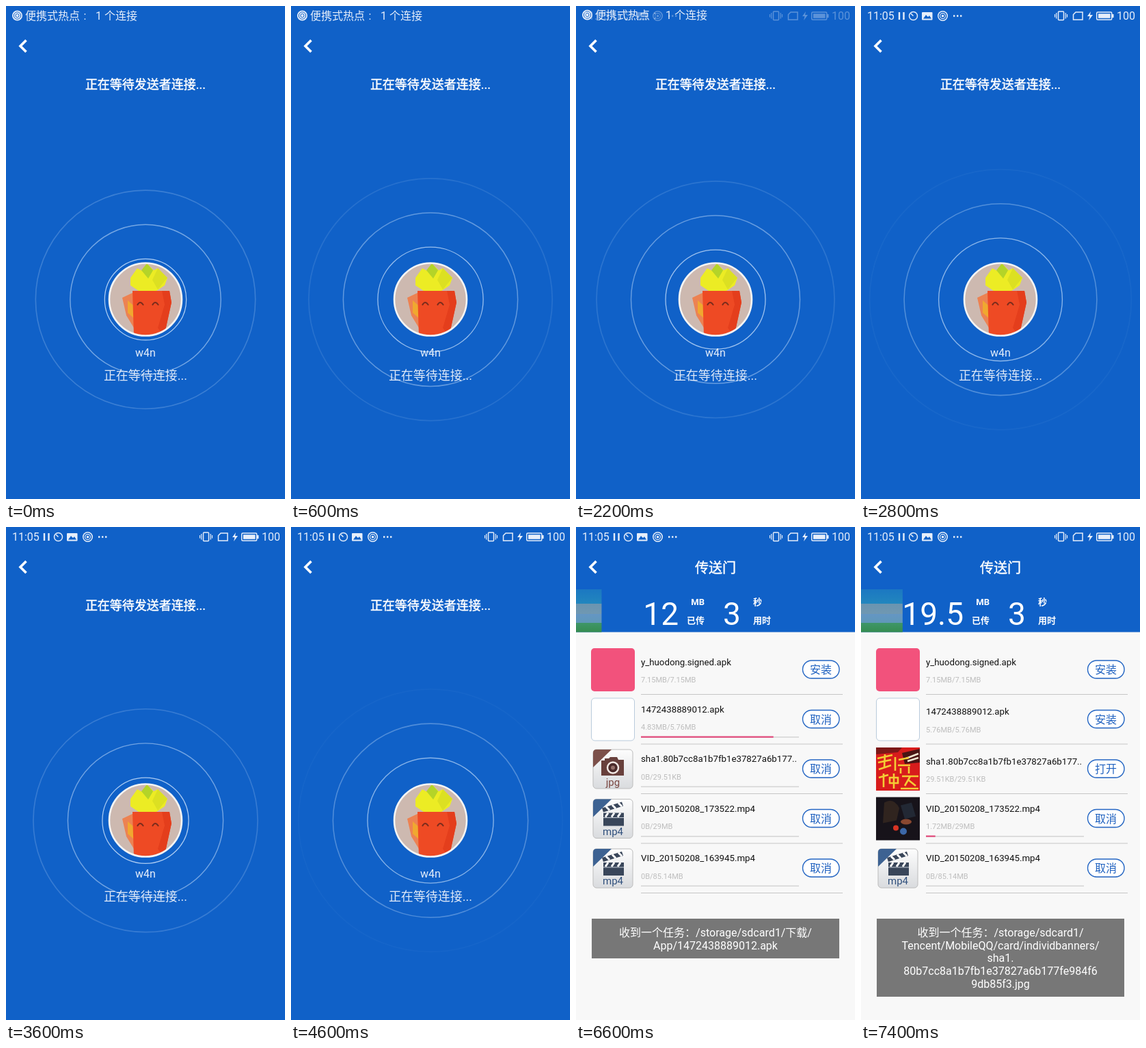
An HTML page that plays this animation: 408 by 720 pixels, repeating every 7600 ms.

```html
<!DOCTYPE html>
<html lang="zh">
<head>
<meta charset="utf-8">
<title>传送门</title>
<style>
  html, body { margin: 0; width: 100%; height: 100%; overflow: hidden; background: #1061c8; }
  svg { display: block; width: 100vw; height: 100vh; }
  text { font-family: Roboto, "Noto Sans CJK SC", "Noto Sans CJK", sans-serif; font-size: 16px; fill: #fff; }
  .mid { text-anchor: middle; }
  .end { text-anchor: end; }
  .title { font-size: 18px; stroke: #fff; stroke-width: .45; }
  .bar text { fill: #e6eefa; }
  .big { font-size: 46px; font-weight: 400; }
  .unit { font-size: 13px; font-weight: 700; }
  .name { font-size: 13.25px; fill: #111; }
  .size { font-size: 11px; fill: #bdbdbd; }
  .action { fill: #2062c0; }
  .ext { font-size: 15px; }
</style>
</head>
<body>
<svg viewBox="0 0 408 720" preserveAspectRatio="none">
  <defs>
    <linearGradient id="tile" x2="0" y2="1">
      <stop stop-color="#fdfdfd"/><stop offset="1" stop-color="#d9dbde"/>
    </linearGradient>
    <linearGradient id="fill" x2="0" y2="1">
      <stop stop-color="#1b78c2"/><stop offset=".33" stop-color="#2286be"/>
      <stop offset=".33" stop-color="#6a94b0"/><stop offset=".58" stop-color="#7098b2"/>
      <stop offset=".58" stop-color="#6496c4"/><stop offset=".79" stop-color="#6098b8"/>
      <stop offset=".79" stop-color="#3f9668"/><stop offset="1" stop-color="#358c50"/>
    </linearGradient>
    <clipPath id="face"><circle cx="204" cy="428.5" r="53"/></clipPath>
    <g id="hotspot" fill="none" stroke="#1061c8">
      <circle r="7.5" fill="#e6eefa" stroke="none"/>
      <circle r="5.2"/><circle r="2.600"/>
    </g>
    <g id="jpg">
      <rect x="1" y="1" width="58" height="57" rx="5" fill="url(#tile)" stroke="#bcbcbc"/>
      <path d="M1 27V6Q1 1 6 1H28Z" fill="#7c504a"/>
      <path d="M13 17H18V14H24L26 12H36L38 16H46V39H13Z" fill="#68403c"/>
      <circle cx="30" cy="27.5" r="8" fill="#4a2a2a" stroke="#f2e8e4" stroke-width="2.5"/>
      <circle cx="30" cy="27.5" r="3" fill="#94706a"/>
      <text class="ext mid" x="30" y="54" style="fill:#7a4640">jpg</text>
    </g>
    <g id="mp4">
      <rect x="1" y="1" width="58" height="57" rx="5" fill="url(#tile)" stroke="#bcbcbc"/>
      <path d="M1 27V6Q1 1 6 1H28Z" fill="#3d6292"/>
      <path d="M14 14L43 5L45 11L16 20Z M16 21H46V40H16Z" fill="#39465a"/>
      <path d="M20 12L25 17M29 9.500L34 14.500M38 6.500L43 11.500M23 21L19 27M32 21L28 27M41 21L37 27" stroke="#fff" stroke-width="3"/>
      <path d="M16 28H46" stroke="#c7ced8"/>
      <text class="ext mid" x="30" y="53" style="fill:#2f4f7c">mp4</text>
    </g>
    <rect id="apk" x="4" y="3" width="52" height="52" fill="#8cbc40"/>
    <rect id="pinkApp" x="-2" y="-2" width="64" height="63" rx="5" fill="#f2527c"/>
    <rect id="whiteApp" x="-1.500" y="-1.500" width="63" height="62" rx="5" fill="#fff" stroke="#b9cbdc"/>
    <g id="banner">
      <path d="M-2-2H62V61H-2Z" fill="#d81c1c"/>
      <path d="M-2-2H36L30 5L-2 8Z" fill="#7c1818"/>
      <path d="M36 6L62 0V20L40 22Z" fill="#4a1414"/>
      <path d="M42 14L60 7M44 18L60 13" stroke="#f0e4d0" stroke-width="2.5"/>
      <path d="M0 14L22 9M1 20L20 16M11 8L10 28M2 30L20 24M26 12V32M31 16L46 13M30 24H48M34 28V36M46 26V36M2 42L16 38M9 36V56M18 42H30V50H18ZM24 36V58M36 40H60M48 40L40 54M46 46L56 54M34 58H60" stroke="#f4cc34" stroke-width="2.6" fill="none"/>
    </g>
    <g id="photo">
      <path d="M-2-2H62V61H-2Z" fill="#17131a"/>
      <path d="M10 6Q24-2 32 14L28 32L8 36Z" fill="#30241f"/>
      <path d="M34 10L50 6L56 26L40 30Z" fill="#222834"/>
      <ellipse cx="42" cy="34" rx="8" ry="4" fill="#8a4830"/>
      <circle cx="27" cy="43" r="4" fill="#d83424"/>
      <circle cx="38" cy="48" r="5" fill="#3c68a8"/>
    </g>
  </defs>

  <g id="waiting">
    <path d="M0 0H408V720H0Z" fill="#1061c8"/>
    <g id="rings" fill="none" stroke="#d8ebff"></g>
    <g clip-path="url(#face)">
      <path d="M150 374H258V483H150Z" fill="#cdb9b0"/>
      <path d="M170 426L187 418V470L176 452Z" fill="#ec8252"/>
      <path d="M178 430L187 438V456L178 448Z" fill="#f0a830"/>
      <path d="M185 416H239L242 433L231 483H187Z" fill="#ee4a24"/>
      <path d="M228 416H239L242 433L231 483L222 470L232 436Z" fill="#e43e1c"/>
      <path d="M182 397L192 383L203 389L206 376L216 386L222 383L236 397L232 408L220 416H194L182 408Z" fill="#ecec24"/>
      <path d="M206 376L215 386L208 398L198 386Z" fill="#b4d428"/>
      <path d="M222 383L236 397L222 414L214 400Z" fill="#dce022"/>
      <path d="M192 437Q196 429 201 437M214 437Q218 429 223 437" fill="none" stroke="#7c2c1c" stroke-width="2"/>
    </g>
    <circle cx="204" cy="428.5" r="53" fill="none" stroke="#f4f4f4" stroke-width="2.6"/>
    <text class="title mid" x="204" y="121">正在等待发送者连接...</text>
    <text class="mid" x="204" y="511.500" style="fill:#e6eefa">w4n</text>
    <text class="mid" x="204" y="545.500" style="font-size:18px;fill:#dfe9f8">正在等待连接...</text>
  </g>

  <g id="list">
    <path d="M0 0H408V720H0Z" fill="#f8f8f8"/>
    <path d="M0 0H408V153.500H0Z" fill="#1061c8"/>
    <rect id="total" y="91" height="62.500" fill="url(#fill)"/>
    <text class="title mid" x="204" y="67" style="font-size:20px">传送门</text>
    <text class="big end" id="amount" y="143"></text>
    <text class="unit end" id="unit" x="188" y="114"></text>
    <text class="unit end" x="188" y="141">已传</text>
    <text class="big" id="seconds" x="215" y="143"></text>
    <text class="unit" x="259" y="114">秒</text>
    <text class="unit" x="259" y="141">用时</text>
    <g id="rows"></g>
    <g id="toast">
      <rect id="toastBox" x="23" width="362" fill="#777"/>
      <g id="toastText"></g>
    </g>
  </g>

  <path d="M29.500 50L21 58.500L29.500 67" fill="none" stroke="#fff" stroke-width="3.6"/>

  <g id="ticker" class="bar">
    <use href="#hotspot" x="16.500" y="14"/>
    <text x="28" y="19.500">便携式热点</text>
    <text x="113.500" y="19.500">:</text>
    <text x="131" y="19.500">1 个连接</text>
  </g>
  <g id="status" class="bar" fill="none" stroke="#e6eefa" stroke-width="1.5">
    <g stroke="none">
      <text x="9" y="20">11:05</text>
      <text x="374" y="20">100</text>
    </g>
    <path d="M56 9V20M62.500 9V20" stroke-width="2.400"/>
    <circle cx="76.500" cy="14.500" r="6"/>
    <path d="M76.500 14.500L73 11"/>
    <rect x="89" y="9" width="15.500" height="11.500" rx="1" fill="#e6eefa" stroke="none"/>
    <path d="M91 18.500L95 13L98 16L100 14L103 18.500Z" fill="#1061c8" stroke="none"/>
    <use href="#hotspot" x="119.500" y="14.500"/>
    <path d="M135 14.500H147.500" stroke-width="2.400" stroke-dasharray="2.400 2.600"/>
    <rect x="288.500" y="8" width="8" height="12.500" rx="1"/>
    <path d="M285.700 10V18.500M299.300 10V18.500M283.500 12V16.500M301.500 12V16.500" stroke-width="1.200"/>
    <path d="M310.500 20V12.500L314 9H324V20Z"/>
    <path d="M336 8L331 15H334.500L333 21L339 13H335Z" fill="#e6eefa" stroke="none"/>
    <rect x="344.700" y="9" width="22" height="11" rx="1.500"/>
    <path d="M347 11.300H364.500V17.700H347ZM367 12H369.500V17H367Z" fill="#e6eefa" stroke="none"/>
  </g>
</svg>

<script>
const LOOP = 7600, STEP = 200, LIST_AT = 5200;
const $ = id => document.getElementById(id);
const show = (el, on) => el.setAttribute('display', on ? 'inline' : 'none');
const setText = (el, s) => { if (el.textContent !== s) el.textContent = s; };
const clamp = (v, lo, hi) => Math.min(hi, Math.max(lo, v));

// start in ms, rate in units per second
const files = [
  { name: 'y_huodong.signed.apk', size: 7.15, start: 5400, rate: 10.2, icon: 'apk', thumb: 'pinkApp', done: '安装' },
  { name: '1472438889012.apk', size: 5.76, start: 6100, rate: 9.66, icon: 'apk', thumb: 'whiteApp', done: '安装' },
  { name: 'sha1.80b7cc8a1b7fb1e37827a6b177..', size: 29.51, unit: 'KB', start: 6790, rate: 1e4, icon: 'jpg', thumb: 'banner', done: '打开' },
  { name: 'VID_20150208_173522.mp4', size: 29, start: 7000, rate: 4.3, icon: 'mp4', thumb: 'photo' },
  { name: 'VID_20150208_163945.mp4', size: 85.14, start: LOOP, rate: 1, icon: 'mp4', thumb: 'mp4' }
];

const toasts = [
  { at: 5400, top: 553, lines: ['收到一个任务：/storage/sdcard1/', 'Android/data/com.husor.beibei/apk/', 'y_huodong.signed.apk'] },
  { at: 6400, top: 572, lines: ['收到一个任务：/storage/sdcard1/下载/', 'App/1472438889012.apk'] },
  { at: 7000, top: 572, lines: ['收到一个任务：/storage/sdcard1/', 'Tencent/MobileQQ/card/individbanners/', 'sha1.', '80b7cc8a1b7fb1e37827a6b177fe984f6', '9db85f3.jpg'] }
];

$('rings').innerHTML = '<ellipse cx="204" cy="428.7"/>'.repeat(3);
$('rows').innerHTML = files.map((f, i) => `
  <g transform="translate(0 ${208 + i * 72.5})">
    <use x="24" y="-29"/>
    <g class="label">
      <text class="name" x="95" y="-10">${f.name}</text>
      <text class="size" x="95" y="15.5"></text>
    </g>
    <g class="track">
      <rect x="95" y="25.5" width="231" height="1.6" fill="#d6d6d6"/>
      <rect class="progress" x="95" y="25" height="2.2" fill="#e2487a"/>
    </g>
    <path d="M95 36.500H390" stroke="#c6c6c6"/>
    <rect x="331.5" y="-12" width="54" height="26" rx="13" fill="#d5dbe4"/>
    <rect x="331.5" y="-13" width="53.5" height="26" rx="13" fill="#fff" stroke="#2466c4" stroke-width="1.4"/>
    <text class="action mid" x="358" y="6"></text>
  </g>`).join('');

const rowEls = [...$('rows').children].map(row => ({
  icon: row.querySelector('use'), label: row.querySelector('.label'), size: row.querySelector('.size'),
  track: row.querySelector('.track'), progress: row.querySelector('.progress'), action: row.querySelector('.action')
}));

function drawRings(t) {
  const gap = 50.5, phase = (9.2 + 0.029 * t) % gap;
  [...$('rings').children].forEach((ring, i) => {
    const r = phase + gap * (i + 1);
    ring.setAttribute('rx', r);
    ring.setAttribute('ry', r * 0.993);
    ring.setAttribute('stroke-opacity', clamp((198 - r) / 175, 0, 1));
    ring.setAttribute('stroke-width', 1 + r / 250);
  });
}

function drawRow(f, el, t) {
  const got = clamp((t - f.start) / 1000 * f.rate, 0, f.size);
  const done = got === f.size, unit = f.unit || 'MB';
  el.icon.setAttribute('href', '#' + (got ? f.thumb : f.icon));
  el.label.setAttribute('transform', `translate(0 ${done ? 3.5 : 0})`);
  setText(el.size, `${got ? +got.toFixed(2) + unit : '0B'}/${f.size}${unit}`);
  show(el.track, !done);
  el.progress.setAttribute('width', 231 * got / f.size);
  setText(el.action, done ? f.done : '取消');
}

let shownToast;
function drawToast(t) {
  const toast = toasts.filter(o => o.at <= t).pop();
  show($('toast'), toast);
  if (!toast) return;
  $('toast').setAttribute('opacity', t < 5600 ? 0.24 : 1);
  if (toast === shownToast) return;
  shownToast = toast;
  const { top, lines } = toast;
  $('toastBox').setAttribute('y', top);
  $('toastBox').setAttribute('height', Math.round(20.5 + lines.length * 18.7));
  $('toastText').innerHTML = lines.map((s, i) =>
    `<text class="mid" x="204" y="${top + 26 + i * 18.7}">${s}</text>`).join('');
}

function drawList(t) {
  const mb = t < 6600 ? Math.max(0, (t - 5400) / 100) : 12 + (t - 6600) * 7.5 / 800;
  $('total').setAttribute('width', mb * 3.12);
  $('amount').setAttribute('x', mb ? 150 : 161);
  setText($('amount'), String(+mb.toFixed(1)));
  setText($('unit'), mb ? 'MB' : 'B');
  setText($('seconds'), String(clamp(Math.floor((t - 5400) / 400), 0, 3)));
  files.forEach((f, i) => drawRow(f, rowEls[i], t));
  drawToast(t);
}

function draw(t) {
  const listed = t >= LIST_AT;
  show($('waiting'), !listed);
  show($('list'), listed);
  show($('ticker'), t < 2400);
  $('ticker').setAttribute('transform', `translate(0 ${t < 2200 ? 0 : -1})`);
  $('status').setAttribute('opacity', t < 2200 ? 0 : t < 2400 ? 0.35 : 1);
  listed ? drawList(t) : drawRings(t);
}

const begin = performance.now();
function tick() {
  const t = (performance.now() - begin) % LOOP;
  draw(Math.floor(t / STEP) * STEP);
  requestAnimationFrame(tick);
}
tick();
</script>
</body>
</html>
```
